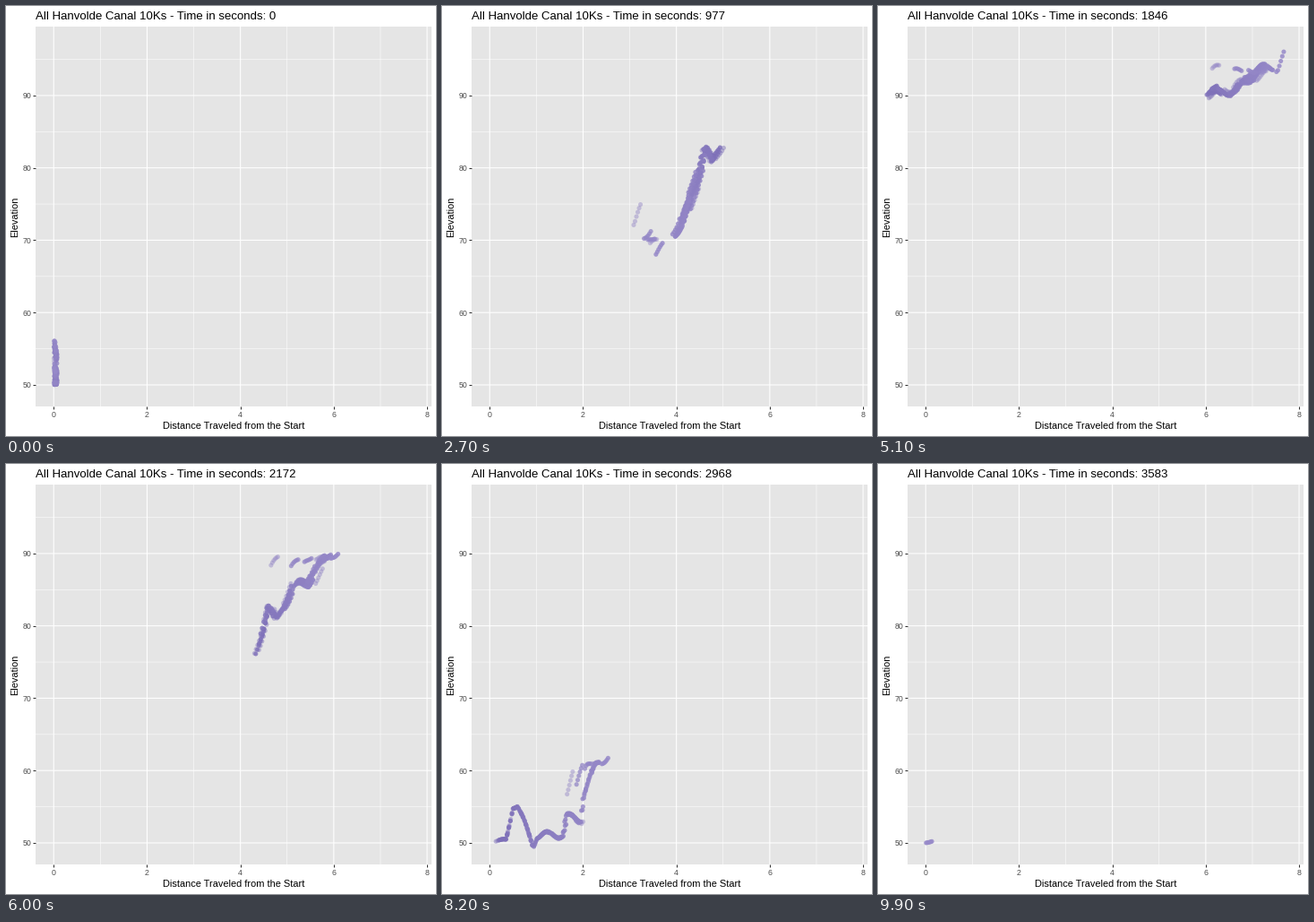
Animation of 480 by 480 pixels, one loop 10 s. Source, as a matplotlib script:

```python
import numpy as np
import matplotlib.pyplot as plt
from matplotlib.animation import FuncAnimation
from matplotlib.colors import to_rgb

SIZE, DPI = 480, 100
FRAMES, END = 100, 3583
PX = 72 / DPI  # one pixel in points
FAR, TURN = 7.7, .507  # turning point: distance, share of the run
CROWD = 42

plt.rcParams["font.family"] = "Liberation Sans"
rng = np.random.default_rng(10)

# Main climbs and dips of the route: distance, elevation
CLIMB = np.array([(0, 50), (.35, 50.5), (.5, 55), (.6, 55), (.93, 49.7),
                  (1, 51), (1.55, 51.2), (1.66, 53.5), (1.96, 53.2),
                  (2.03, 57), (2.25, 60.5), (4.1, 72), (4.25, 74.5),
                  (4.6, 82.7), (4.75, 80.6), (5.1, 85.5), (5.45, 86),
                  (5.95, 90.3), (6.6, 90.6), (7, 92.9), (7.55, 94.2),
                  (FAR, 96.5)])


def elevation(x):
    ripple = .5 * np.minimum(1, x) * np.cos(4 * np.pi * (x - .22))
    return np.interp(x, *CLIMB.T) + ripple


def route_pos(u):
    """Out with a slight speed-up, back at a steady pace."""
    out = (u / TURN) ** 1.07
    back = (1 - u) / (1 - TURN)
    return FAR * np.where(u < TURN, out, back)


# A dense crowd, then slower runs that set off further along the route
late_shift = np.array([1, .6, .4, .25, 0])
total = np.r_[np.linspace(3010, 3480, CROWD), np.linspace(3430, 3600, 5)]
shift = np.r_[rng.normal(0, .05, CROWD), late_shift]
drift = np.r_[rng.normal(0, .008, CROWD), -.02 * (1 - late_shift)]
RUNS = len(total)


def column(values):
    return np.asarray(values)[:, None]


bias = column(rng.normal(0, .25, RUNS))
start_rise = column(6.5 * rng.random(RUNS) ** 1.3)
start_x = column(rng.uniform(0, .03, RUNS))
offsets = np.linspace(-16, 16, 6) + column(rng.uniform(-2, 2, RUNS))


def swarm(seconds):
    """Positions of all readings near the given time, with their run index."""
    u = (seconds + offsets) / column(total)
    alive = (u >= 0) & (u <= 1)
    u = np.clip(u, 0, 1)
    wobble = column(drift) * np.sin(2 * np.pi * u)
    pos = route_pos(np.clip(u + wobble, 0, 1))
    fade = np.minimum(1, np.minimum(u / .12, (1 - u) / .35))
    early = np.exp(-u / .015)
    x = pos - column(shift) * fade + start_x * early
    y = elevation(pos) + bias * fade + start_rise * early
    points = np.column_stack([np.clip(x, 0, FAR)[alive], y[alive]])
    return points, np.nonzero(alive)[0]


fig = plt.figure(figsize=(SIZE / DPI, SIZE / DPI), dpi=DPI, facecolor="white")
ax = fig.add_axes([33.2 / SIZE, 32.8 / SIZE, 441.3 / SIZE, 424 / SIZE],
                  facecolor="#E5E5E5")
ax.set(xlim=(-.385, 8.085), ylim=(47, 99.5),
       xticks=range(0, 9, 2), yticks=range(50, 91, 10))
ax.set_xticks(range(1, 8, 2), minor=True)
ax.set_yticks(range(55, 96, 10), minor=True)
ax.set_axisbelow(True)
ax.grid(which="major", color="white", lw=1.07 * PX, snap=False)
ax.grid(which="minor", color="white", lw=.53 * PX, snap=False)
ax.tick_params(which="major", length=2.75 * PX, width=1.07 * PX, pad=2.2 * PX,
               color="#333333", labelcolor="#4D4D4D", labelsize=8.8 * PX)
ax.tick_params(which="minor", length=0)
for side in ax.spines.values():
    side.set_visible(False)


def label(x, y, text, size, **kw):
    return fig.text(x / SIZE, 1 - y / SIZE, text, fontsize=size * PX,
                    va="baseline", rotation_mode="anchor", **kw)


title = label(33.2, 15, "", 13.2)
label(254, 472, "Distance Traveled from the Start", 11, ha="center")
label(13.5, 235, "Elevation", 11, ha="center", rotation=90)

# Faster runs are darker
dark, light = np.array(to_rgb("#7A6CB6")), np.array(to_rgb("#978AC9"))
speed_tone = column((total - total.min()) / np.ptp(total)) ** .6
colors = np.column_stack([dark + (light - dark) * speed_tone,
                          rng.choice([.45, .75, .8, .85], RUNS)])
dots = ax.scatter([], [], s=(5.1 * PX) ** 2, linewidths=0, zorder=3)


def update(i):
    seconds = i * END / (FRAMES - 1)
    points, run = swarm(seconds)
    dots.set_offsets(points)
    dots.set_facecolors(colors[run])
    title.set_text(f"All Hanvolde Canal 10Ks - Time in seconds: {seconds:.0f}")
    return dots, title


anim = FuncAnimation(fig, update, frames=FRAMES, interval=100,
                     repeat=True, repeat_delay=0, blit=False)
plt.show()
```
